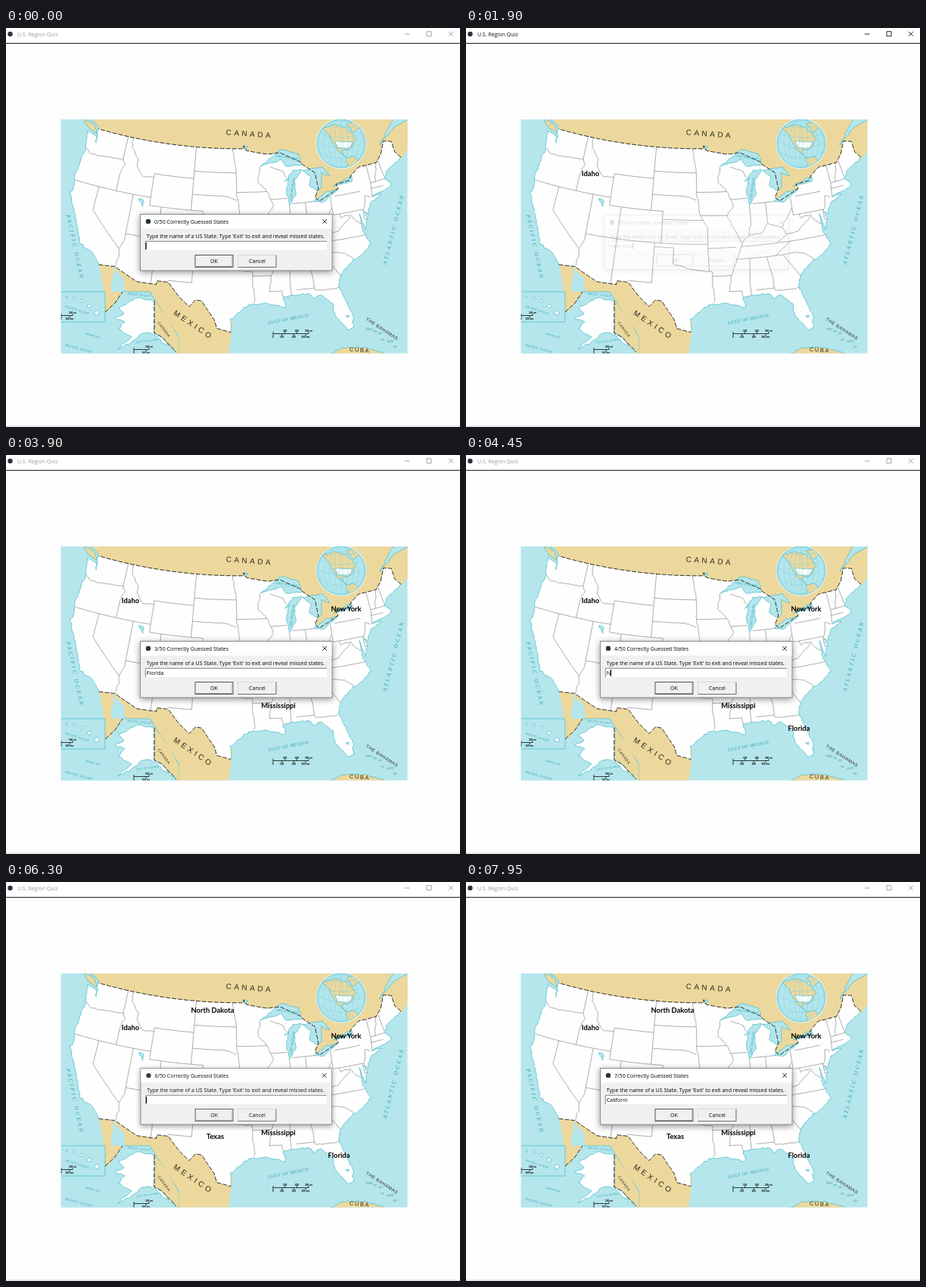
These frames come from a looping animation (600x528 px, 8 s). An HTML page:

```html
<!DOCTYPE html>
<html lang="en">
<head>
<meta charset="utf-8">
<title>U.S. Region Quiz</title>
<style>
  html, body { margin: 0; width: 100%; height: 100%; overflow: hidden; background: #fdfdfe; }
  svg { display: block; width: 100vw; height: 100vh; font: 7.05px "Open Sans", "Noto Sans", sans-serif; }
  .line { fill: none; stroke: #8a8a8a; stroke-width: .7; }
  .border { fill: none; stroke: #1c1a12; stroke-width: .9; stroke-dasharray: 6 2; }
  .coast { fill: none; stroke: #45b9c6; stroke-width: .7; stroke-linejoin: round; }
  .land { fill: #ecd89d; }
  .sea { fill: #b4e6ec; }
  .us { fill: #fefefe; }
  .country { font-family: "Liberation Sans", Arial, sans-serif; fill: #2c281c; }
  .water { font-family: "Liberation Serif", Times, serif; font-style: italic; fill: #2b9dab; }
  .state { font: bold 9.4px Lato, "Open Sans", sans-serif; text-anchor: middle; }
  .scale { font: bold 3.2px "Liberation Sans", Arial, sans-serif; text-anchor: middle; }
  #dialog { filter: drop-shadow(0 2px 4px rgba(0, 0, 0, .42)); }
</style>
</head>
<body>
<svg viewBox="0 0 600 528" preserveAspectRatio="none">
  <clipPath id="frame"><rect x="72.5" y="121" width="458" height="309.5"/></clipPath>
  <clipPath id="disc"><circle cx="443" cy="153" r="32"/></clipPath>
  <rect width="600" height="528" fill="#fdfdfe"/>
  <rect width="600" height="20" fill="#fff"/>
  <path d="M0 20.3H600" stroke="#3c3c3c" stroke-width="1.2"/>
  <path d="M0 527H600" stroke="#d2d2d6"/>
  <circle cx="5.5" cy="8" r="3.2" fill="#26343d"/>
  <g id="caption">
    <text x="15" y="10.8" fill="currentColor">U.S. Region Quiz</text>
    <path d="M527 8H533.5M556 4.7H562V10.8H556ZM585 4.8L591 10.8M591 4.8L585 10.8" fill="none" stroke="currentColor" stroke-width=".9"/>
  </g>

  <g clip-path="url(#frame)">
    <rect x="72" y="120" width="460" height="312" class="sea"/>
    <g id="map"></g>
    <circle cx="443" cy="153" r="33.5" fill="#e8f8fa"/>
    <circle cx="443" cy="153" r="32" class="sea" stroke="#52bdca" stroke-width=".8"/>
    <g id="globe" clip-path="url(#disc)"></g>
    <g id="names"></g>
  </g>
  <g id="states"></g>

  <g id="dialog">
    <rect x="177.5" y="246.5" width="253.5" height="74.5" fill="#f0f0f0" stroke="#8b8b8b"/>
    <rect x="178" y="247" width="252.5" height="18.5" fill="#fff"/>
    <circle cx="188" cy="256" r="3.2" fill="#26343d"/>
    <text id="score" x="196" y="258.7"></text>
    <path d="M418.3 253L424 258.7M424 253L418.3 258.7" stroke="#111" stroke-width=".9"/>
    <text x="185.8" y="278.3">Type the name of a US State. Type 'Exit' to exit and reveal missed states.</text>
    <rect x="184" y="282" width="240" height="12" fill="#fff"/>
    <path d="M184.3 294V282.3H424" fill="none" stroke="#777" stroke-width=".9"/>
    <text id="entry" x="185.8" y="291"></text>
    <rect id="caret" y="284" width="1.2" height="8.8"/>
    <g fill="#f0f0f0">
      <rect x="250" y="300.5" width="50" height="16" stroke="#555"/>
      <path d="M251 315.5H299V301.5" fill="none" stroke="#999"/>
      <rect x="306.5" y="300.5" width="50.5" height="16" stroke="#d9d9d9"/>
      <path d="M306.5 316.5H357V300.5" fill="none" stroke="#6d6d6d"/>
    </g>
    <g text-anchor="middle"><text x="275" y="311.2">OK</text><text x="332" y="311.2">Cancel</text></g>
  </g>
</svg>

<script>
const $ = id => document.getElementById(id);
const svg = (parent, tag, attrs, text = "") => {
  const node = document.createElementNS("http://www.w3.org/2000/svg", tag);
  for (const key in attrs) node.setAttribute(key, attrs[key]);
  node.textContent = text;
  return $(parent).appendChild(node);
};
const draw = (className, d, parent = "map") => svg(parent, "path", { class: className, d });

let seed = 7;
const random = () => (seed = seed * 16807 % 2147483647) / 2147483647;
const jitter = size => (random() - .5) * 2 * size;

// Albers equal-area conic; longitudes are degrees west.
const RAD = Math.PI / 180, CONE = 0.60285;
function project([west, north]) {
  const radius = Math.sqrt(1.3512 - 2 * CONE * Math.sin(north * RAD)) / CONE;
  const angle = CONE * (96 - west) * RAD;
  return [308.2 + 606 * radius * Math.sin(angle), 602 * radius * Math.cos(angle) - 503.5];
}

const parse = text => text.split(",").map(pair => pair.split(" ").map(Number));

// Cuts every segment into pieces of about `step`, shifting the inner points by up to `wiggle`.
function divide(points, step, wiggle = 0) {
  return points.flatMap((b, i) => {
    if (!i) return [b];
    const a = points[i - 1];
    const count = Math.ceil(Math.hypot(b[0] - a[0], b[1] - a[1]) / step) || 1;
    return Array.from({ length: count }, (_, k) =>
      a.map((v, axis) => v + (b[axis] - v) * (k + 1) / count + (k + 1 < count ? jitter(wiggle) : 0)));
  });
}
const geo = (text, wiggle = 0) => {
  const points = divide(parse(text), 2).map(project);
  return wiggle ? divide(points, 3.5, wiggle) : points;
};
const flat = (text, wiggle = 1.2) => divide(parse(text), 4, wiggle);
const path = points => "M" + points.map(p => p.map(v => v.toFixed(1)).join(" ")).join("L");

// Neighbouring countries
draw("land", "M112 118L120 128 124 137 300 185 380 220 430 228 480 195 522 173 533 160V118Z");
draw("coast", path(flat("112 120,120 128,124 137")));
draw("land coast", path(flat("101 119,116 127,120 139,109 132,101 119")));
draw("sea coast", path(flat("494 155,512 119,534 119,512 132,494 155", .8)));
draw("land", path(geo("117.1 32.6,114.8 32.6,114.6 30,113 27,115 27,115.8 30,117.1 32.6", .8)));
draw("land", path([...geo("114.8 32.5,113 31.3,112.2 29", .8), ...parse("190 349,228 432,294 432,298 404,300 390,240 335,200 325")]));

// United States
const WIGGLE = 1.3;
const pacific = geo("122.75 49,122.5 47.2,122.9 48.1,124.7 48.4,124 46.2,124.5 42.85,124.1 41,124.4 40.4,122.4 37.5,120.6 34.5,118.4 33.8,117.12 32.53", WIGGLE);
const south = geo("117.12 32.53,114.72 32.72,111.07 31.33,108.2 31.33,108.2 31.78,106.5 31.78,104.7 30.1,103.15 28.97,102.3 29.88,101.4 29.77,99.5 27.5,99.1 26.4,97.14 25.95");
const gulf = geo("97.14 25.95,97.3 27.6,94.7 29.4,91.8 29.5,89.4 28.95,89.6 30.2,86 30.4,85.3 29.7,84.2 30.07,82.65 28.8,82.6 27.4,81.2 25.2,80.3 25.4,80.05 26.8,81.4 30.7", WIGGLE);
const atlantic = geo("81.4 30.7,80.9 32.1,78.6 33.86,77.95 33.87,75.5 35.25,76.3 37,76.3 39.3,75.9 37.2,75.1 38.6,75.5 39.5,74.9 39,74 40.4,72 41.05,73.6 41,70.6 41.6,70 41.9,70.8 42.8,70.2 43.6,67 44.8", WIGGLE);
const north = geo("67 44.8,67.8 45.7,67.8 47.07,69.2 47.4,70.3 45.9,71.5 45.02,74.7 45,76.3 44.2,76.8 43.63,79.2 43.45,78.9 42.9,82.4 41.7,83.1 42.2,82.3 43.2,82.5 45.3,84.5 46.5,84.9 46.9,88.4 48.3,90.8 48.2,94.6 48.75,95.15 49.38,95.15 49,122.75 49");
draw("us", path([...pacific, ...south, ...gulf, ...atlantic, ...north]));

// Surveyed lines run straight; rivers and ridges wander between a few key points.
const surveyed = [
  "124.2 42,111.05 42", "117.03 49,117.03 46", "117.03 44.2,117.03 42", "104.05 45,111.05 45,111.05 41,102.05 41,102.05 37",
  "104.05 49,104.05 41", "120 42,120 39,114.63 35", "114.05 42,114.05 36.2,114.63 35", "114.05 37,94.62 37", "109.05 41,109.05 31.33",
  "102.05 40,95.3 40", "104.05 45.94,96.56 45.94", "104.05 43,98.5 43", "94.62 39.1,94.62 36.5,94.48 33.65", "96.45 43.5,91.22 43.5",
  "95.77 40.6,91.4 40.5", "94.62 36.5,90.15 36.5", "103.04 36.5,100 36.5,100 34.55", "103.04 37,103.04 32,106.62 32", "94.04 33,91.17 33",
  "91.6 31,89.75 31", "88.2 35,88.47 31.9,88.4 30.35", "90.3 35,83.1 35", "89.5 36.55,75.9 36.55", "85.6 35,85 32.3,85 31,87.6 31",
  "80.52 42,80.52 39.72,75.6 39.72,75.6 38.45,75.1 38.45", "87.53 39.4,87.53 41.7", "84.82 39.1,84.82 41.72", "87 41.76,83.4 41.73",
  "90.65 42.5,87.8 42.5", "79.76 42,75.35 42", "73.6 41,73.3 42.75,73.35 45", "73.5 42.03,71.3 42.03", "73.27 42.72,70.8 42.8", "71.08 45.3,70.8 43.1"
];
const natural = [
  "124 46.25,122.8 45.7,119 45.95,116.92 46,116.5 45.5,117.03 44.2", "116.05 49,115.9 47.8,114.5 46.6,114.3 45.5,113 44.45,111.05 44.5",
  "114.63 35,114.4 34,114.72 32.72", "98.5 43,96.45 42.5", "97.2 49,96.56 46,96.45 43.5,95.8 40.6,94.62 39.1",
  "100 34.55,97.2 33.85,94.04 33.55,94.04 32,93.7 30.2,93.85 29.7",
  "92.1 46.75,92.75 44.75,91.22 43.5,90.2 41.8,91.4 40.4,90.2 38.6,89.15 37,90.1 35.1,91.17 33,91.6 31", "89.75 31,89.6 30.2",
  "85 31,84.86 30.7,82.2 30.57,81.45 30.7", "83.1 35,81.9 33.5,80.9 32.05", "83.1 35,81 35.1,79.7 34.8,78.55 33.86", "84.3 35,81.7 36.55",
  "83.7 36.6,82 37.5,82.6 38.4", "89.15 37,88 37.9,86 38,84.8 39.1,82.6 38.4,80.6 40.6", "88 37.9,87.53 39.4", "90.4 46.55,88.1 45.9,87.6 45.1",
  "82 37.5,80.3 37.6,77.8 39.2", "79.48 39.72,79.4 39.2,77.75 39.4,77.1 38.5,76.3 38", "75.5 39.6,75 40.5,74.7 41.36,73.9 41", "72.5 42.73,71.5 45.02"
];
surveyed.forEach(line => draw("line", path(geo(line))));
natural.forEach(line => draw("line", path(geo(line, .8))));

const lakes = [
  "92.1 46.75,88.2 47.4,87.5 46.5,84.6 46.5,85 47.95,88.2 48.7,92.1 46.75",
  "87.5 41.65,87.8 43.5,87.2 45,88 44.6,86.3 45.95,84.8 45.9,86.3 44.5,86.2 42.9,87.5 41.65",
  "84.7 45.8,83.3 44.8,83.8 43.8,82.5 43,81.7 43.4,81.4 45.2,80 44.6,81 45.9,84.7 45.8",
  "83.4 41.75,81.7 41.5,78.9 42.85,81.3 42.65,83.4 41.75", "79.7 43.3,76.4 43.4,76.2 44.1,79.7 43.3",
  "113 41.6,112.2 41.5,112.1 40.7,113 41.6", "95.3 49.4,94.4 49.3,94.8 48.8,95.3 49.4", "81.1 27,80.6 27,80.8 26.7,81.1 27"
];
lakes.forEach(lake => draw("sea coast", path(geo(lake, .8)) + "Z"));
[pacific, gulf, atlantic].forEach(shore => draw("coast", path(shore)));
[north, south].forEach(line => draw("border", path(line)));

// Insets and islands
draw("sea", "M73 349H131V377L155 349H190L228 408V432H73Z");
draw("land", "M131 349H155L136 374 131 376Z");
draw("coast", "M73 349H131V389H73M155 349H190L228 408V431");
draw("border", "M131 376L144 364 154 349");
draw("land", "M196 360L216 388 228 411V432L196 404Z");
draw("us coast", path(flat("196 361,196 404,206 409,225 429,192 404,180 404,165 416,148 425,166 409,148 398,157 389,144 384,156 378,149 370,174 357,196 361")));
draw("border", "M196 361V404L206 409 225 429");
draw("land coast", path(flat("423 433,446 423,466 422,513 433")));
for (let i = 0; i < 5; i++) svg("map", "circle", { class: "coast", cx: 80 + 10 * i, cy: 356 + 1.3 * i * i, r: 1 + .5 * i, style: "fill:#fff" });
for (let i = 0; i < 8; i++) svg("map", "ellipse", { class: "land coast", cx: 477 + 5.5 * i + jitter(2), cy: 396 + 3.5 * i + jitter(3), rx: 2.2, ry: .9 });

// Globe
draw("land coast", path(flat("418 133,432 128,449 131,463 147,454 160,443 163,449 171,437 161,428 144,418 133")), "globe");
draw("land coast", path(flat("450 127,462 124,468 131,459 138,450 127")), "globe");
draw("land coast", path(flat("449 171,462 171,468 178,452 187,449 171")), "globe");
draw("us coast", path(flat("435 150,458 151,453 160,438 158,435 150", .7)), "globe");
for (let i = 0; i < 5; i++) {
  const look = { fill: "none", stroke: "#7fd0da", "stroke-width": .5 };
  svg("globe", "ellipse", { ...look, cx: 443, cy: 153, rx: 2 + 7 * i, ry: 32 });
  svg("globe", "path", { ...look, d: `M411 ${126 + 12 * i}q32 ${12 + 3 * i} 64 0` });
}

// class, text, centre x, centre y, rotation, size, letter spacing
[
  ["country", "CANADA", 322, 140, 4, 10, 3.5], ["country", "MEXICO", 248, 393, 34, 10, 3.7], ["country", "CANADA", 209, 399, 53, 5, .6],
  ["country", "THE BAHAMAS", 497, 398, 33, 6, .6], ["country", "CUBA", 467.5, 426, 5, 7.5, 1.6],
  ["water", "PACIFIC OCEAN", 91.5, 290, 78, 7.3, 2.7], ["water", "ATLANTIC OCEAN", 512, 266, -76, 7.3, 2.7],
  ["water", "GULF OF MEXICO", 373, 385, -11, 6, .4], ["water", "ARCTIC OCEAN", 176, 353, 6, 4, .3],
  ["water", "PACIFIC OCEAN", 94, 373, 18, 4, .3], ["water", "PACIFIC OCEAN", 96, 424, 15, 4.5, .3], ["water", "BERING SEA", 115, 407, 15, 3.5, 0],
  ["water", "GULF OF ALASKA", 187, 414, -8, 3.5, .2], ["water", "LAKE SUPERIOR", 371, 171, 9, 4, 0], ["water", "LAKE MICHIGAN", 378, 213, -82, 4, 0]
].forEach(([kind, text, x, y, turn, size, spacing]) => svg("names", "text", {
  class: kind, "text-anchor": "middle", transform: `translate(${x} ${y}) rotate(${turn})`, y: size * .35,
  style: `font-size:${size}px;letter-spacing:${spacing}px`
}, text));

function scaleBar(x, y, width, marks) {
  let d = `M${x} ${y}h${width}M${x} ${y - 2.5}v5`;
  for (let i = 1; i <= marks; i++) {
    const at = x + width * i / marks, last = i === marks;
    d += `M${at} ${y}v-2.5M${at - 4} ${y}v2.5`;
    svg("names", "text", { class: "scale", x: at, y: y - 3 }, i * 100 + (last ? " mi" : ""));
    svg("names", "text", { class: "scale", x: at - 4, y: y + 5.8 }, i * 100 + (last ? " km" : ""));
  }
  svg("names", "text", { class: "scale", x, y: y + 5.8 }, "0");
  svg("names", "path", { d, stroke: "#111", "stroke-width": .8 });
}
scaleBar(353, 404.5, 47, 3);
scaleBar(73, 380.5, 15, 1);
scaleBar(169, 425.5, 20, 1);

// Each prompt closes at a set time; the next one opens after a short pause.
const LOOP = 8000, TICK = 50, FADE = 200, PAUSE = 250, LEAD = 210, REST = 130;
const rounds = [
  { name: "Idaho", x: 164.5, y: 196, close: 550 },
  { name: "New York", x: 449.5, y: 207.3, close: 1750 },
  { name: "Mississippi", x: 360, y: 335, close: 3000 },
  { name: "Florida", x: 440, y: 364.5, close: 3950 },
  { name: "North Dakota", x: 273, y: 173.3, close: 5200 },
  { name: "Texas", x: 276.5, y: 340, close: 5900 },
  { name: "Kansas", x: 282, y: 262, close: 7050 },
  { name: "California", x: 115, y: 265, close: 8160 }
];
rounds.forEach((r, i) => {
  r.open = i ? rounds[i - 1].close + PAUSE : -FADE;
  r.gap = (r.close - REST - r.open - LEAD) / r.name.length;
  r.label = svg("states", "text", { class: "state", x: r.x, y: r.y }, r.name);
});

const clamp = v => Math.min(1, Math.max(0, v));

function render(t) {
  const index = rounds.findLastIndex(r => t >= r.open);
  const { name, open, close, gap } = rounds[index];
  const shown = 1 - (1 - clamp((t - open) / FADE)) ** 2;
  const gone = clamp((t - close) / FADE);
  const scale = .94 + .06 * shown - .055 * gone;

  $("dialog").style.opacity = shown * (1 - gone) ** 1.4;
  $("dialog").setAttribute("transform", `translate(304 284) scale(${scale}) translate(-304 -284)`);
  $("caption").style.color = t < close ? "#999" : "#111";
  $("score").textContent = index + "/50 Correctly Guessed States";

  const typed = Math.max(0, Math.floor((t - open - LEAD) / gap) + 1);
  $("entry").textContent = name.slice(0, typed);
  $("caret").setAttribute("x", 184.5 + (typed ? $("entry").getComputedTextLength() + 1 : 0));
  $("caret").style.visibility = (t - open) % 900 < 600 ? "visible" : "hidden";

  rounds.forEach(r => r.label.style.display = t >= r.close + FADE ? "" : "none");
}

const start = performance.now();
function loop() {
  const elapsed = (performance.now() - start) % LOOP;
  render(Math.floor(elapsed / TICK) * TICK);
  requestAnimationFrame(loop);
}
loop();
</script>
</body>
</html>
```
